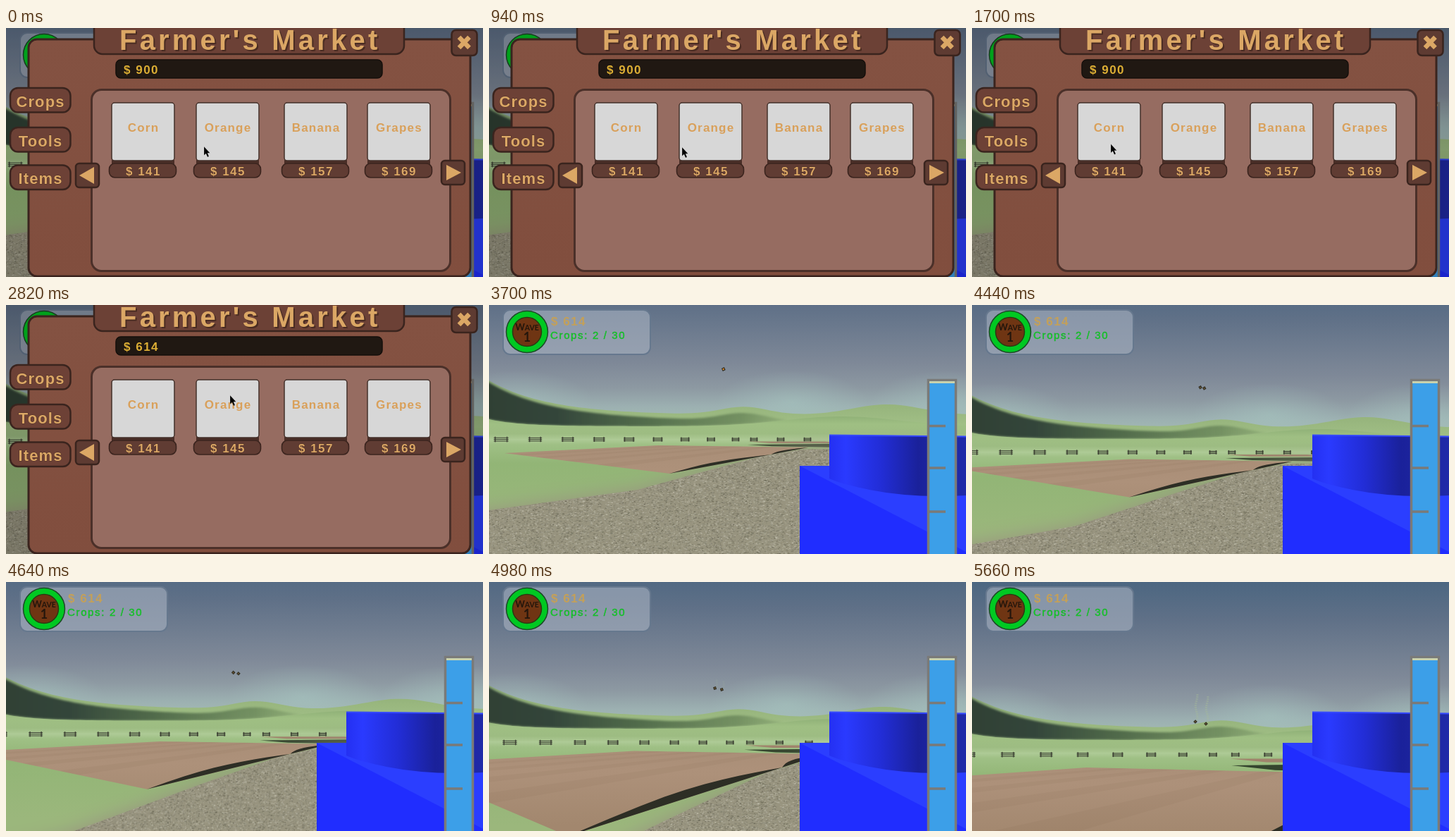
An HTML page with a canvas for the animation above (5.73 s loop, 677 px wide and 353 px high).

```html
<!DOCTYPE html>
<html lang="en">
<head>
<meta charset="utf-8">
<title>Farm game</title>
<style>
  html, body { margin: 0; width: 100%; height: 100%; overflow: hidden; background: #5f7087; }
  canvas, svg { position: absolute; left: 0; top: 0; width: 677px; height: 353px; display: block; }
  text { font-family: "Liberation Sans", Arial, sans-serif; font-weight: bold; white-space: pre; }
  .box { stroke: #3a241e; stroke-width: 2.5; }
  .gold { fill: #dba765; paint-order: stroke; stroke: #4a2c22; stroke-width: .8; }
  .name { fill: #d9a05a; }
  .cash { fill: #dcae34; font-size: 17px; letter-spacing: 1.5px; }
  .badge { font-family: Lato, sans-serif; fill: #24160c; text-anchor: middle; }
</style>
</head>
<body>
<canvas id="scene" width="677" height="353"></canvas>
<svg viewBox="0 0 677 353">
  <defs>
    <linearGradient id="drum">
      <stop offset="0" stop-color="#2430f2"/><stop offset=".12" stop-color="#2a3aff"/>
      <stop offset=".38" stop-color="#222dd6"/><stop offset=".65" stop-color="#1a219a"/>
      <stop offset="1" stop-color="#202aa8"/>
    </linearGradient>
    <linearGradient id="panel" x2="0" y2="1">
      <stop offset="0" stop-color="#845242"/><stop offset="1" stop-color="#814e3e"/>
    </linearGradient>
  </defs>

  <g id="tank">
    <path d="M441 228H677V353H441Z" fill="#202dff"/>
    <path d="M441 228H677V350L660 341Z" fill="#2b3eff"/>
    <path d="M483 184L677 186V270Q600 274 540 262Q500 254 483 246Z" fill="url(#drum)"/>
    <path d="M483 184.5L677 186.5" stroke="#3549ff" stroke-width="2"/>
  </g>
  <g id="gauge">
    <rect x="623.5" y="106.5" width="39" height="260" fill="#3c9fe8" stroke="#7a7a78" stroke-width="3.5"/>
    <rect x="625" y="108" width="36" height="3" fill="#c8d2ae"/>
    <path d="M624 171.5H648M624 231H648M624 293H648" stroke="#7a7a78" stroke-width="3.5"/>
  </g>
  <g id="hud">
    <rect x="20" y="7" width="209" height="63" rx="10" fill="#a9b2c2" fill-opacity=".6" stroke="#66788e" stroke-width="2"/>
    <circle cx="54" cy="38" r="29.5" fill="#00c922" stroke="#1c4a26" stroke-width="1.5"/>
    <circle cx="54" cy="38" r="20.5" fill="#6f3513" stroke="#2a3a12" stroke-width="1.5"/>
    <text class="badge" x="54" y="35.500" font-size="13">W<tspan font-size="10.5">AVE</tspan></text>
    <text class="badge" x="54" y="52" font-size="18">1</text>
    <text id="hudCash" class="cash" x="88" y="29" style="fill:#c4a058"></text>
    <text x="87" y="48" font-size="15" letter-spacing="1.65" fill="#10d824" stroke="#14a526" stroke-width=".4" style="font-weight:normal">Crops: 2 / 30</text>
  </g>

  <g id="menu">
    <rect width="677" height="353" opacity=".2"/>
    <rect class="box" x="32" y="16" width="627" height="336" rx="12" fill="url(#panel)" style="stroke-width:3"/>
    <rect class="box" x="125" y="-30" width="440" height="67" rx="12" fill="#6c4136"/>
    <text x="163" y="33" font-size="40" letter-spacing="4.2" fill="#4a2c22">Farmer's Market</text>
    <text x="161" y="31" font-size="40" letter-spacing="4.2" fill="#dba765">Farmer's Market</text>
    <rect x="156" y="45" width="378" height="26" rx="7" fill="#201812" stroke="#150f0b" stroke-width="1.5"/>
    <text id="cash" class="cash" x="167" y="65"></text>
    <rect class="box" x="121.5" y="87.5" width="509" height="257" rx="14" fill="#966c61" style="stroke:#4b3029;stroke-width:3"/>
    <g id="items"></g>
    <rect class="box" x="99" y="192" width="33" height="34" rx="5" fill="#5e3b32"/>
    <path d="M104 209L125 197V221Z" fill="#dba765"/>
    <rect class="box" x="618" y="188" width="33" height="34" rx="5" fill="#5e3b32"/>
    <path d="M646 205L625 194V216Z" fill="#dba765"/>
    <rect class="box" x="632.5" y="3" width="36" height="36" rx="6" fill="#5e3b32"/>
    <path d="M643 13L657.5 28M657.5 13L643 28" stroke="#dba765" stroke-width="6.5"/>
    <path id="cursor" d="M0 0V12.5L2.8 10L5 15L7 14L5 9.300H8.500Z" fill="#000" stroke="#fff" stroke-opacity=".35" stroke-width=".6"/>
  </g>
</svg>
<script>
const LOOP = 5730, MENU_END = 3240, WALK_START = 3700, WALK_END = 5660;
const W = 677, H = 353;
const $ = id => document.getElementById(id);
const g = $('scene').getContext('2d');

// Menu tabs and cards
const tab = (label, y) => `<rect class="box" x="6" y="${y}" width="85.5" height="34.5" rx="11" fill="#6d4136"/>
  <text class="gold" x="49" y="${y + 26.5}" font-size="22" letter-spacing="1.1" text-anchor="middle">${label}</text>`;
const card = (label, price, x) => `<path d="M${x} 186h89v8h-89z" fill="#4a2e27"/>
  <rect x="${x}" y="106" width="89" height="82" rx="4" fill="#d7d7d7" stroke="#43302a" stroke-width="1.5"/>
  <text class="name" x="${x + 45}" y="147" font-size="17" letter-spacing="1.2" text-anchor="middle">${label}</text>
  <rect x="${x - 3.5}" y="192" width="95" height="20" rx="8" fill="#603c33" stroke="#3b241e" stroke-width="1.6"/>
  <text class="gold" x="${x + 45}" y="209" font-size="17" letter-spacing="1.5" text-anchor="middle">$ ${price}</text>`;
$('items').innerHTML = tab('Crops', 85) + tab('Tools', 141) + tab('Items', 194.5) +
  card('Corn', 141, 150) + card('Orange', 145, 270) + card('Banana', 157, 395) + card('Grapes', 169, 513);

// Timing
const part = (t, from, to) => Math.min(1, Math.max(0, (t - from) / (to - from)));
const mix = (a, b, k) => a + (b - a) * k;

function pointer(t) {
  let x = 281, y = 168;
  const glide = (from, to, nx, ny) => {
    const k = part(t, from, to);
    x = mix(x, nx, k);
    y = mix(y, ny, k);
  };
  glide(939, 940, 274, 169);
  glide(1070, 1290, 197, 164.5);
  glide(2110, 2490, 318, 128);
  glide(2830, 3120, 650, 18);
  return `translate(${x} ${y})`;
}

// Vanishing x, horizon y and distance walked
function camera(t) {
  const u = part(t, WALK_START, WALK_END), rest = 1 - part(t, MENU_END, WALK_START);
  const tilt = (u + (1 - Math.cos(Math.PI * u)) / 2) / 2;
  return {
    cx: 350 - 4 * rest - 8 * part(t, WALK_START, 4150),
    hy: 180 + 3 * rest + 52 * tilt,
    walk: 1.2 * part(t, 3950, WALK_END) ** 1.4
  };
}

// Ground shapes as [x, depth]
const corner = [-94, 1], right = [280, 2.7];
const field = [corner, [-646, 1.97], [-341, 3.1], right];
const gravel = [[-200, .5], [-100, .72], [-45, 1.07], [60, 1.7], [230, 2.4], [600, 2.4], [600, .1], [-200, .1]];
const farField = [[78, 4.4], [560, 4.4], [560, 3.7], [190, 3.7]];
const hollow = [[55, 3.3], [500, 3.5], [500, 2.6], [150, 2.9]];
const along = k => [mix(corner[0], right[0], k), mix(corner[1], right[1], k)];
const ditch = [corner, along(.5), right];
for (let k = .95; k > 0; k -= .05) {
  const [x, z] = along(k);
  ditch.push([x - 30 * Math.abs(Math.sin(2 * Math.PI * k)), z]);
}

// Hill outlines
const bump = (x, mid, w) => Math.exp(-(((x - mid) / w) ** 2));
const ridge = x => 156 - 49 * Math.exp(-x / 85) - 11 * bump(x, 362, 48) - 15 * bump(x, 565, 70);
const meadow = x => 172 - 10 * Math.exp(-x / 45) - 14 * bump(x, 500, 115);
const shadeTop = x => Math.min(meadow(x), ridge(x) + 3 + x * .016);

let seed = 7;
const rnd = () => (seed = seed * 16807 % 2147483647) / 2147483647;
const grit = document.createElement('canvas');
grit.width = 256;
grit.height = 128;
const gg = grit.getContext('2d');
for (let i = 0; i < 8000; i++) {
  const v = 75 + rnd() * 135;
  gg.fillStyle = `rgba(${v + 6},${v + 4},${v - 12},.5)`;
  gg.fillRect(rnd() * 256, rnd() * 128, 1 + rnd() * 2, 1);
}
const gritFill = g.createPattern(grit, 'repeat');

function ramp(x0, y0, x1, y1, ...stops) {
  const r = g.createLinearGradient(x0, y0, x1, y1);
  stops.forEach(([o, c]) => r.addColorStop(o, c));
  return r;
}
// Fill between two outlines
function band(top, bottom, fill) {
  g.beginPath();
  for (let x = -40; x <= 720; x += 8) g.lineTo(x, top(x));
  for (let x = 720; x >= -40; x -= 8) g.lineTo(x, bottom(x));
  g.fillStyle = fill;
  g.fill();
}

function drawSky(cx, hy) {
  g.fillStyle = ramp(0, hy - 240, 0, hy, [0, '#496580'], [.25, '#5f7087'], [.6, '#7f8998'],
    [.74, '#8d99a2'], [.85, '#9cb0b1'], [1, '#a9c3b6']);
  g.fillRect(0, 0, W, H);
  for (const x of [40, 430, 650]) {
    const mist = g.createRadialGradient(0, 0, 0, 0, 0, 45);
    mist.addColorStop(0, 'rgba(168,200,194,.5)');
    mist.addColorStop(1, 'rgba(168,200,194,0)');
    g.save();
    g.translate(cx - 350 + x, hy - 42);
    g.scale(2.4, 1);
    g.fillStyle = mist;
    g.fillRect(-45, -45, 90, 90);
    g.restore();
  }
}

function drawHills(cx, hy) {
  const floor = () => 200;
  g.save();
  g.translate((cx - 350) * .8, hy - 180);
  band(ridge, floor, ramp(0, 105, 0, 190, [0, '#88a578'], [.4, '#95b37b'], [.8, '#a2c087'], [1, '#a9c68f']));
  g.filter = 'blur(1.5px)';
  band(shadeTop, meadow, ramp(0, 0, 480, 0, [0, '#304034'], [.2, '#33453a'], [.45, 'rgba(67,92,64,.85)'],
    [.75, 'rgba(88,116,76,.6)'], [1, 'rgba(125,155,102,0)']));
  g.filter = 'none';
  band(meadow, floor, ramp(0, 157, 0, 196, [0, '#8fb077'], [.3, '#9fbf83'], [.65, '#9dbc82'], [1, '#b7d2a0']));
  g.restore();
}

function drawGround({ cx, hy, walk }) {
  const near = walk + .06;
  // Project a shape, cutting off what lies behind the viewer
  const shape = (pts, fill) => {
    g.beginPath();
    const put = ([x, z]) => g.lineTo(cx + x / (z - walk), hy + 59 / (z - walk));
    pts.forEach((p, i) => {
      const q = pts[(i + 1) % pts.length];
      if (p[1] >= near) put(p);
      if ((p[1] < near) !== (q[1] < near)) put([mix(p[0], q[0], (near - p[1]) / (q[1] - p[1])), near]);
    });
    g.closePath();
    g.fillStyle = fill;
    g.fill();
  };

  g.fillStyle = ramp(0, hy + 8, 0, hy + 130, [0, '#b3ce9c'], [.08, '#9fc085'], [.3, '#92b576'], [1, '#9bb77c']);
  g.fillRect(0, hy + 10, W, H);
  shape(farField, '#a0846c');
  shape(hollow, '#34452e');

  g.save();
  g.shadowColor = '#98947f';
  g.shadowBlur = 26;
  shape(gravel, '#98947f');
  gritFill.setTransform(new DOMMatrix().translate(cx, hy));
  g.shadowBlur = 0;
  shape(gravel, gritFill);
  g.restore();

  shape(field, ramp(0, hy + 20, 0, hy + 130, [0, '#a98e77'], [.3, '#ad917a'], [1, '#a2876e']));
  for (let k = .2; k < 1; k += .2) {
    const [x, z] = [mix(-94, -646, k), mix(1, 1.97, k)], [fx, fz] = [mix(280, -341, k), mix(2.7, 3.1, k)];
    shape([[x, z], [x - 45, z + .08], [fx - 45, fz + .03], [fx, fz]], 'rgba(115,90,68,.08)');
  }
  shape(ditch, '#2d2e25');
}

function drawFences({ cx, hy, walk }) {
  const zoom = 6.6 / (6.6 - walk);
  g.fillStyle = '#3c4033';
  for (let i = -4; i < 10; i++) {
    const x = i < 0 ? 26 - 38 * (i + 1) : -34 * i - .95 * i * i;
    const w = (11 + Math.max(0, -x) * .03) * Math.sqrt(zoom), h = w * .2 + 2.5;
    const px = cx + x * zoom - w / 2, py = hy + 10 * zoom - h / 2 + .5;
    for (const k of [.08, .42, .78]) g.fillRect(px, py + h * k, w, 1);
    for (const k of [.1, .9]) g.fillRect(px + w * k - .7, py - .5, 1.4, h + 1);
  }
}

function drawCrops(t, hy) {
  const v = part(t, WALK_START, WALK_END), smoke = part(t, 4800, 5300);
  const x = 333 - 16 * v ** .6, y = hy - 89 + 55 * v * v;
  for (const [px, py, skin] of [[x, y, '#c9a545'], [x + 15 * v, y + 3 * v, '#d98a2e']]) {
    g.fillStyle = `rgba(165,185,150,${.42 * smoke})`;
    for (let i = 3; i < 40 * smoke; i += 3) g.fillRect(px + Math.sin(i * 2.3) * 1.3, py - i, 3.2, 2);
    g.save();
    g.translate(px, py);
    g.rotate(t / 160);
    g.fillStyle = '#2c2a20';
    g.fillRect(-2, -2, 4, 4);
    g.fillStyle = v < .3 ? skin : '#5f5032';
    g.fillRect(-1, -1.2, 2.2, 2.2);
    g.restore();
  }
}

const start = performance.now();
function frame(now) {
  const t = Math.max(0, now - start) % LOOP, cam = camera(t);
  drawSky(cam.cx, cam.hy);
  drawHills(cam.cx, cam.hy);
  drawGround(cam);
  drawFences(cam);
  drawCrops(t, cam.hy);
  $('menu').style.display = t < MENU_END ? '' : 'none';
  $('cash').textContent = $('hudCash').textContent = '$ ' + (t < 1770 ? 900 : t < 2630 ? 759 : 614);
  $('cursor').setAttribute('transform', pointer(t));
  requestAnimationFrame(frame);
}
frame(start);
</script>
</body>
</html>
```
